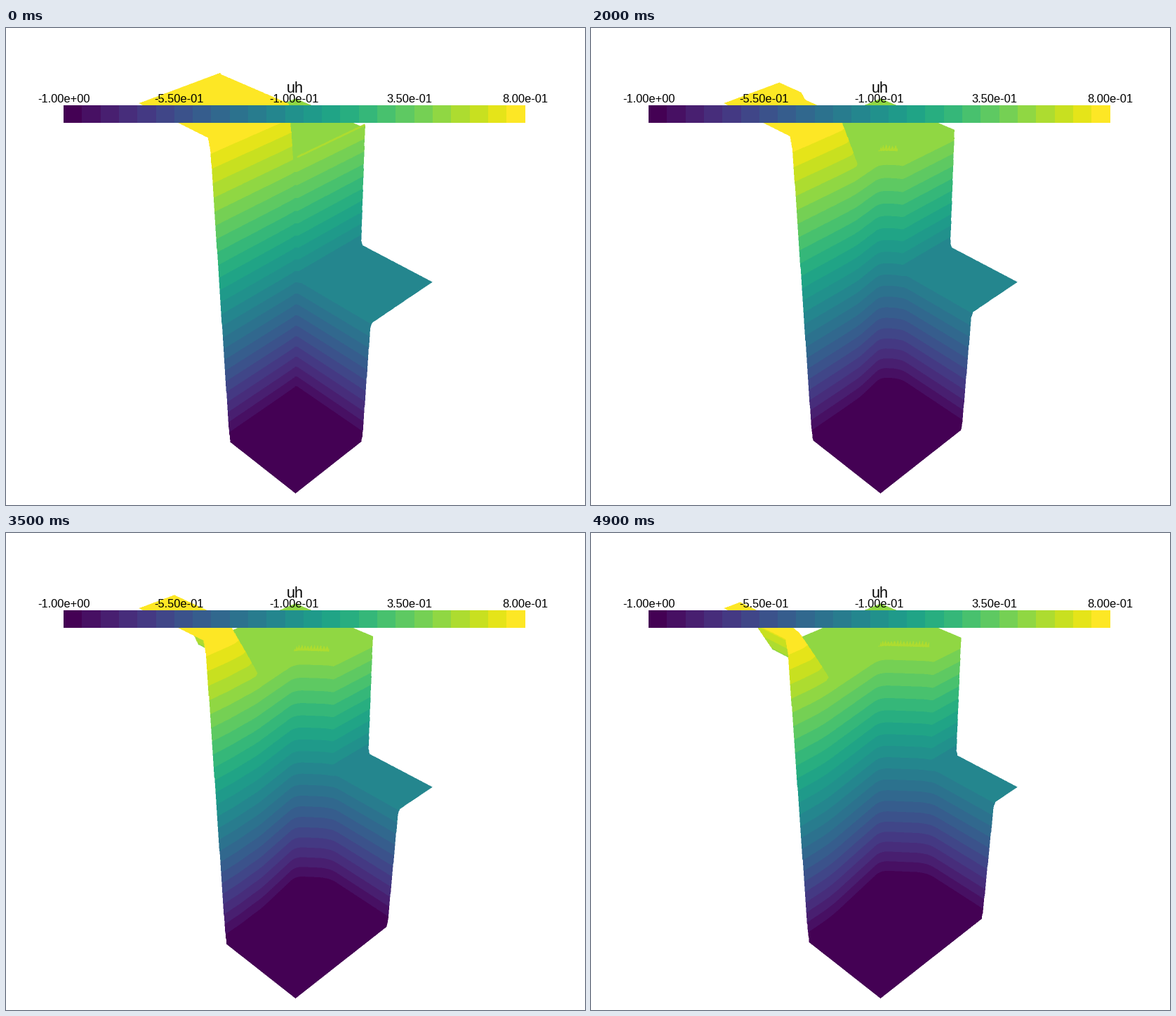
These frames come from a looping animation (825 px wide and 679 px high, 5 s). A matplotlib script:

```python
import numpy as np
import matplotlib.pyplot as plt
from matplotlib.animation import FuncAnimation
from matplotlib.patches import Rectangle

W, H, DPI = 825, 679, 100
FRAMES, INTERVAL = 50, 100
BANDS, U_MIN, U_MAX = 25, -1.0, 0.8
BLANK = -9.0

# Perspective camera looking along (-1, -1, -1) at the middle of the surface
FOCAL = H / 2 / np.tan(np.radians(15))
DIST, MID_Z = 4.536, -0.102
SIN, COS = np.sqrt(1 / 3), np.sqrt(2 / 3)
CAM_Z, CAM_RANGE = MID_Z + DIST * SIN, DIST * COS
HALF_DIAG = np.sqrt(0.5)

# Screen area holding the surface, sampled twice per pixel each way
LEFT, RIGHT, TOP, BOTTOM = 180, 618, 54, 670
sx = (np.arange(LEFT, RIGHT, 0.5) + 0.25 - W / 2) / FOCAL
sy = (H / 2 - np.arange(TOP, BOTTOM, 0.5) - 0.25) / FOCAL
pitch = (sy * COS - SIN) / (COS + sy * SIN)
azimuth = sx[None, :] * (COS - pitch * SIN)[:, None]

# Fan of vertical slices through the camera
RAYS, STEPS = 840, 480
reach = HALF_DIAG / CAM_RANGE * 0.9999
tau = np.linspace(-reach, reach, RAYS)
near = (CAM_RANGE - HALF_DIAG) / (1 - abs(tau))
far = (CAM_RANGE + HALF_DIAG) / (1 + abs(tau))
ground = near[:, None] + (far - near)[:, None] * np.linspace(0, 1, STEPS)
forward, side = ground - CAM_RANGE, ground * tau[:, None]
X = (-forward - side) / np.sqrt(2)
Y = (-forward + side) / np.sqrt(2)

# Where each screen sample finds its slice and pitch
order = pitch[::-1]
ray = np.rint((azimuth + reach) / (2 * reach) * (RAYS - 1)).astype(int)
row = np.arange(len(pitch))[::-1][:, None]
lookup = np.where((ray < 0) | (ray >= RAYS), RAYS * len(pitch),
                  ray * len(pitch) + row)

viridis = plt.get_cmap("viridis", BANDS)(np.arange(BANDS))[:, :3]
palette = np.vstack([np.rint(viridis * 255), [255] * 3]).astype(np.uint16)


def tent(d, half_width):
    return np.clip(1 - abs(d) / half_width, 0, 1)


def soft_min(a, b, k):
    return np.minimum(a, b) - np.maximum(k - abs(a - b), 0) ** 2 / (4 * k)


def shock_distance(t):
    """Signed distance into the u = -1 region, with rounded corners."""
    xi = X / t
    front = np.where(xi > 0.5, xi - 5 / 18 * (xi + 1) ** 2, xi / 6 - 5 / 24)
    front = np.where(xi > 0.8, -0.1, front) * t
    # The straight shock on the left advances one mesh row at a time
    lag = 0.1 * t - np.floor(10 * t + 1e-6) / 100
    front += lag * np.clip((X - 0.8 * t) / 0.1, 0, 1)
    slanted = (Y + 8 / 7 * X + 15 / 28 * t) / np.hypot(1, 8 / 7)
    k = 0.05 * t / (t + 0.1)
    return soft_min(X + 0.6 * t, soft_min(slanted, Y - front, k), k)


def burgers(t):
    """Four-state Riemann problem of the 2D Burgers equation, centred at 0."""
    s_low = shock_distance(t)
    s_back = Y - 0.15 * t

    # Smeared rarefaction; fresh inflow from the far edge keeps it crisp
    inside = np.clip((Y + 0.5 - 0.75 * t) / (0.35 * t), 0, 1)
    start = 0.5 * t - 0.004
    stop = 0.8 * t + 0.008 + 0.04 * (1 - np.exp(-t / 0.05)) * inside
    u = 0.5 + 0.3 * np.clip((X - start) / (stop - start), 0, 1)
    back = np.interp(s_back, [-0.006, 0.007, 0.017], [0, 0.96, 1])
    u = np.where(X < start, 0.5 - 0.7 * back, u)

    # Small overshoot: a short-lived rim, then a toothed crest by the shock
    rim = 0.022 * np.exp(-(t - 0.01) / 0.01)
    u += rim * tent(s_back + 0.01, 0.01) * (X < 0)
    along = Y - X
    tooth = 1 - abs(2 * (X / 0.01 % 1) - 1)
    crest = np.clip((along + 0.03) / 0.04, 0, 1) * (along < 0.75 * t - 0.04)
    u += crest * (0.016 + 0.03 * tooth) * tent(s_low + 0.02, 0.012)

    drop = np.interp(s_low, [-0.02, -0.009, 0, 0.007], [0, 0.035, 0.94, 1])
    return u + (U_MIN - u) * drop


def render(t):
    u = burgers(t)
    slope = (u - CAM_Z) / ground
    high = np.maximum.accumulate(slope, axis=1)
    low = np.minimum.accumulate(slope, axis=1)
    seen = np.empty((RAYS, len(order)))
    for k in range(RAYS):
        seen[k] = np.interp(order, high[k], u[k], left=BLANK, right=BLANK)
        start = high[k, 0]
        if low[k, -1] < start:  # underside below the near edge
            n = np.searchsorted(order, start)
            seen[k, :n] = np.interp(order[:n], low[k, ::-1], u[k, ::-1],
                                    left=BLANK)
    band = np.clip((seen - U_MIN) / (U_MAX - U_MIN) * BANDS, 0, BANDS - 1)
    band = np.where(seen < -5, BANDS, band).astype(np.uint8)
    index = np.append(band.ravel(), np.uint8(BANDS))[lookup]
    total = sum(palette[index[i::2, j::2]] for i in (0, 1) for j in (0, 1))
    return (total // 4).astype(np.uint8)


fig = plt.figure(figsize=(W / DPI, H / DPI), dpi=DPI, facecolor="white")
ax = fig.add_axes([0, 0, 1, 1])
surface = ax.imshow(render(0.01), extent=(LEFT, RIGHT, BOTTOM, TOP),
                    interpolation="nearest", aspect="auto")
ax.set(xlim=(0, W), ylim=(H, 0))
ax.axis("off")

# Colour bar
BAR_X, BAR_Y, BAR_W, BAR_H = 82, 110, 657.5, 24.5
edges = np.rint(BAR_X + BAR_W * np.arange(BANDS + 1) / BANDS)
for x0, x1, color in zip(edges, edges[1:], viridis):
    ax.add_patch(Rectangle((x0, BAR_Y), x1 - x0, BAR_H, color=color, lw=0,
                           antialiased=False, zorder=3))


def label(x, y, text, px):
    ax.text(x, y, text, fontsize=px * 72 / DPI, family="Liberation Sans",
            color="black", ha="center", va="baseline", zorder=4)


for i in range(5):
    value = U_MIN + (U_MAX - U_MIN) * i / 4
    label(82.5 + 164.2 * i, 105.5, f"{value:.2e}", 16.5)
label(412, 92.5, "uh", 21.8)


def update(i):
    surface.set_data(render((i + 1) / 100))
    return [surface]


anim = FuncAnimation(fig, update, frames=FRAMES, interval=INTERVAL,
                     repeat=True, repeat_delay=0)
plt.show()
```
